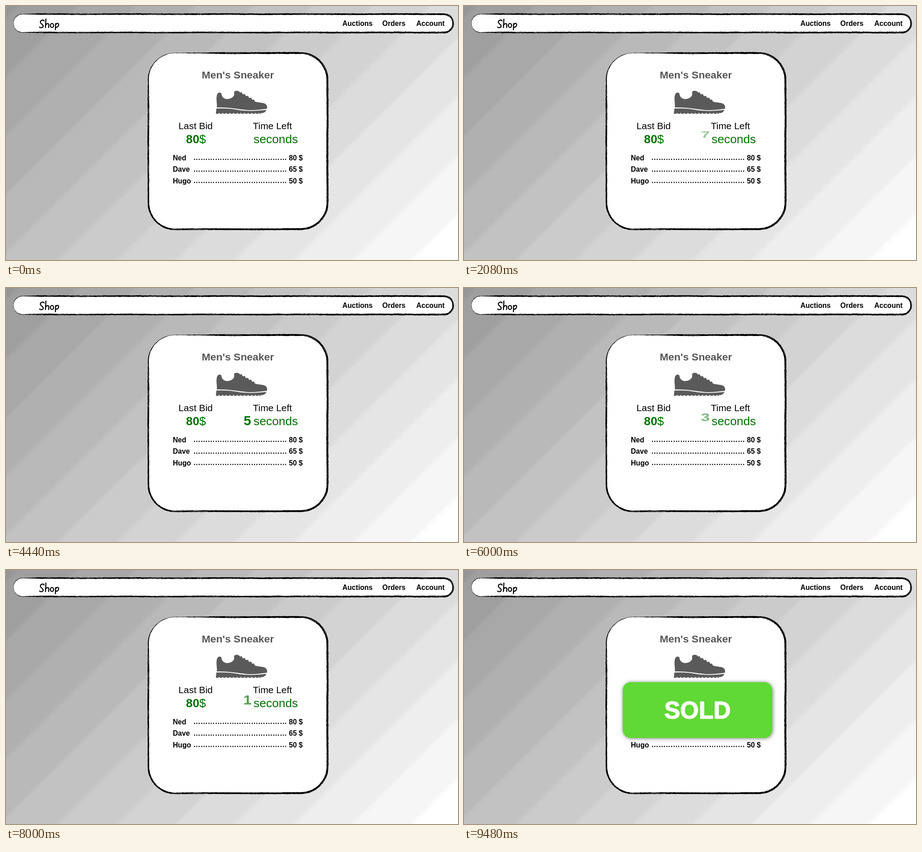
Recreate the animation shown at these times as an HTML page. Size 997x561 px, loop 9960 ms.

```html
<!DOCTYPE html>
<html lang="en">
<head>
<meta charset="utf-8">
<title>Auction countdown</title>
<style>
  html, body { margin: 0; width: 100%; height: 100%; overflow: hidden; }
  svg { display: block; width: 997px; height: 561px; font-family: "Liberation Sans", Arial, sans-serif; }
  .bold { font-weight: 700; }
  .nav { font-size: 15.6px; }
  .row { font-size: 15.7px; }
  .dots { font-size: 15.9px; }
  .label { font-size: 20.9px; }
  .value { font-size: 26.3px; fill: #017100; }
  .digit { font-size: 29.5px; fill: #017100; text-anchor: middle; }
  .pen { fill: none; stroke: #000; stroke-width: 2.3; stroke-linecap: round; stroke-linejoin: round; }
</style>
</head>
<body>
<svg viewBox="0 0 997 561">
  <defs>
    <filter id="shadow" x="-10%" y="-20%" width="120%" height="140%">
      <feDropShadow dx="1" dy="1" stdDeviation="4.5" flood-color="#000" flood-opacity=".5"/>
    </filter>
  </defs>

  <g id="frames"></g>

  <g class="pen" role="img" aria-label="Shop">
    <path d="M84 33C82 29 75 32 76 36.500C77 40 83 41 82 45C81 48.500 76 48.500 74 46.500"/>
    <path d="M88 29L87 47.500M87 43C89 38.500 94.500 37 94.500 42L94 47.500"/>
    <ellipse cx="101.500" cy="43" rx="3.600" ry="4.400"/>
    <path d="M109.500 39L109 52.500M109.500 41.500C112 36.500 117 38 116 42C115.300 45.500 112.500 47.500 109.500 46.500"/>
  </g>
  <g class="nav bold">
    <text x="742" y="44">Auctions</text>
    <text x="830" y="44">Orders</text>
    <text x="905" y="44">Account</text>
  </g>

  <text class="bold" x="511.500" y="160" font-size="22.900" fill="#555655" text-anchor="middle">Men's Sneaker</text>
  <g fill="#5a5a5a">
    <path d="M465 224C466 215 463 207 465 198C466 192 471 189 475 193C476 200 479 204 486 205.500C495 206 503 201 503.500 195
      L503 190C506 186.500 510 187 514 188.500L516 191L520 190.500L522 195L527 194.500L529 199L534 198.500L536 203L541 202.500
      L543 207L547 206.500L549 211C556 213.500 565 213 571 215.500C575 217.500 577 222 575.500 227C560 229 545 231 529 229.500C510 228 500 224 465 224Z"/>
    <path d="M464 226.500C485 225.500 500 227 514 230C535 233 556 231.500 574.500 229.500C573 233 570 236 565 236.500L463 236.500Z"/>
    <path d="M463 237H562" fill="none" stroke="#5a5a5a" stroke-width="2" stroke-dasharray="6 2"/>
  </g>

  <text class="label" x="380.500" y="272">Last Bid</text>
  <text class="value" x="397" y="302.500"><tspan class="bold">80</tspan>$</text>

  <g id="running">
    <text class="label" x="544.500" y="272">Time Left</text>
    <text class="value" x="546" y="302.500">seconds</text>
    <g id="flip"><text id="digit" class="digit bold" y="10.300"></text></g>
  </g>
  <g id="ended">
    <text class="label" x="544.500" y="269">Time Left</text>
    <text class="digit bold" x="535.500" y="304">0</text>
    <text class="value" x="551" y="305">seconds</text>
  </g>

  <g id="bids" class="row bold"></g>

  <g id="sold">
    <rect x="350" y="247.500" width="330" height="123.500" rx="18" fill="#61d836" filter="url(#shadow)"/>
    <text class="bold" x="515" y="328" font-size="52.800" text-anchor="middle"
      fill="#fff" stroke="#fff" stroke-width="1.500" stroke-linejoin="round">SOLD</text>
  </g>
</svg>
<script>
  const LOOP = 9960, PERIOD = 970, TURN = 360, CUT = 9 * PERIOD;
  const SOLD_IN = 8800, SOLD_END = 9480;
  const $ = id => document.getElementById(id);
  const clamp = v => Math.max(0, Math.min(1, v));

  function add(parent, tag, attrs, text = '') {
    const el = document.createElementNS('http://www.w3.org/2000/svg', tag);
    for (const k in attrs) el.setAttribute(k, attrs[k]);
    el.textContent = text;
    return parent.appendChild(el);
  }

  let seed = 7;
  const rand = () => (seed = seed * 16807 % 2147483647) / 2147483647;

  // Diagonal grey bands with crisp edges
  function paintBackdrop() {
    const stops = [], step = 130 / 1558, last = 1456 / 1558;
    const tone = n => { const g = Math.round(150 + 105 * n / 12); return `rgb(${g},${g},${g})`; };
    for (let i = 0; i <= 11; i++) {
      const edge = last - (11 - i) * step;
      stops.push(`${tone(i)} ${(edge - step * .06) * 100}%`, `${tone(i + 1)} ${(edge + step * .06) * 100}%`);
    }
    document.body.style.background = `linear-gradient(135deg, ${stops})`;
  }

  // White panel with a charcoal outline that thins out near (thinX, thinY)
  function sketchPanel(x, y, width, height, rx, weight, thinX, thinY, reach) {
    const g = $('frames');
    const base = add(g, 'rect', { x, y, width, height, rx, fill: '#fff' });
    const total = base.getTotalLength(), count = Math.round(total / 2.5);
    const outer = [], inner = [], streak = [];
    for (let i = 0; i < count; i++) {
      const s = i / count * total;
      const p = base.getPointAtLength(s), q = base.getPointAtLength((s + .5) % total);
      const len = Math.hypot(q.x - p.x, q.y - p.y) || 1;
      const nx = (q.y - p.y) / len, ny = (p.x - q.x) / len;
      const near = clamp(Math.hypot(p.x - thinX, p.y - thinY) / reach);
      const side = .8 + .2 * (p.x - x) / width;
      const wide = weight * side * (.25 + .75 * near * near);
      const wave = .2 * Math.sin(s / 31);
      const at = d => `${(p.x + nx * d).toFixed(1)} ${(p.y + ny * d).toFixed(1)}`;
      outer.push(at(wide / 2 + wave + (rand() - .5) * .7));
      inner.push(at(-wide / 2 + wave + (rand() - .5) * .7));
      streak.push(at(-wide * .2 + Math.sin(s / 47) * wide * .35));
    }
    const ring = pts => 'M' + pts.join('L') + 'Z';
    add(g, 'path', { d: ring(outer) + ring(inner), 'fill-rule': 'evenodd' });
    add(g, 'path', {
      d: ring(streak), fill: 'none', stroke: '#fff', 'stroke-width': .6,
      'stroke-dasharray': '23 31 9 47 38 18', opacity: .6
    });
  }

  function listBids() {
    [['Ned', 80], ['Dave', 65], ['Hugo', 50]].forEach(([name, bid], i) => {
      const y = 340.5 + i * 25.7;
      add($('bids'), 'text', { x: 368, y }, name);
      add($('bids'), 'text', { x: 413, y: y - .5, class: 'dots' }, '…'.repeat(13));
      add($('bids'), 'text', { x: 624, y }, bid + ' $');
    });
  }

  // Each digit rolls in from above and out below, like the face of a drum
  function rollDigit(t) {
    const k = Math.floor(t / PERIOD), phase = t - k * PERIOD;
    const into = clamp(phase / TURN), out = clamp((phase - PERIOD + TURN) / TURN);
    const angle = (into - 1 + out) * Math.PI / 2;
    const zoom = 1 + .25 * Math.abs(Math.sin(angle));
    $('digit').textContent = 9 - k;
    $('flip').setAttribute('transform',
      `translate(532.5 ${292.7 + 11 * Math.sin(angle)}) scale(${zoom} ${zoom * Math.cos(angle)})`);
    $('flip').setAttribute('opacity', Math.min(into, 1 - out));
  }

  function render(t) {
    const over = t >= CUT;
    $('running').style.display = over ? 'none' : '';
    $('ended').style.display = over ? '' : 'none';
    if (!over) rollDigit(t);
    const p = clamp((t - SOLD_IN) / (SOLD_END - SOLD_IN));
    const size = 1 + .143 * (1 - p);
    $('sold').setAttribute('opacity', p);
    $('sold').setAttribute('transform', `translate(515 309) scale(${size}) translate(-515 -309)`);
  }

  paintBackdrop();
  sketchPanel(16.5, 18, 970, 40.5, 20.2, 3.7, 16, 38, 60);
  sketchPanel(314, 104, 395, 389, 59, 4.2, 360, 105, 110);
  listBids();

  const start = performance.now();
  function tick() {
    render((performance.now() - start) % LOOP);
    requestAnimationFrame(tick);
  }
  tick();
</script>
</body>
</html>
```
